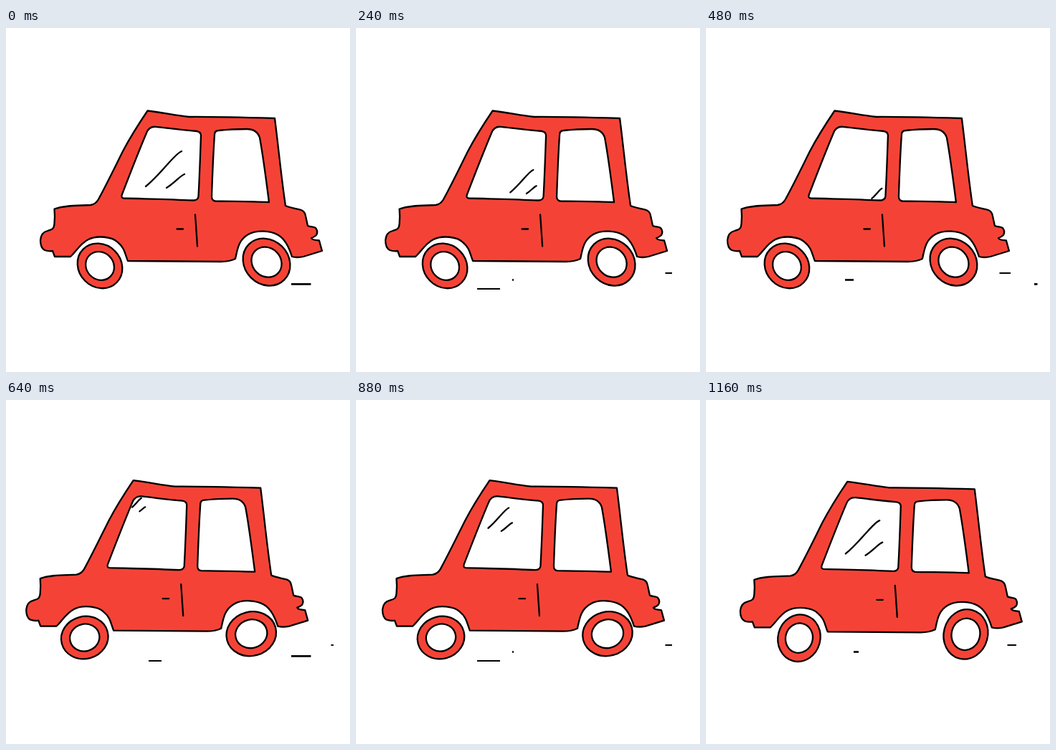
Animation, 480 px wide and 480 px high, one loop 1200 ms. Source, as an HTML page with a canvas:

```html
<!DOCTYPE html>
<html lang="en">
<head>
<meta charset="utf-8">
<title>Red car</title>
<style>
  html, body { margin: 0; width: 100%; height: 100%; overflow: hidden; background: #fff; }
  canvas { display: block; width: 480px; height: 480px; }
</style>
</head>
<body>
<canvas id="stage" width="480" height="480"></canvas>
<script>
const ctx = document.getElementById('stage').getContext('2d');
const RED = '#f44336', INK = '#000', WHITE = '#fff';
const LOOP = 1200, STEP = 40;

const body = new Path2D(`M197.5 115.5 C220 118 236 122 256 124 C292 123.7 332 124.8 375 126
  C380 165 384 208 390 248 C397 251 405 252 412 254 Q417 256 418 262 L421 276
  C426 278 429 277 432 279 Q436 284 433 289 Q430 292 426 293 Q427 296 437 296.5
  L441 311 L415 319 Q406 321 399 319 C395 306 390 295 380 289
  C370 283 350 281 338 288 C324 296 323 309 320 322 Q312 326 300 326
  C255 326 215 325 170 325 C166 316 166 307 156 299
  C148 291 127 289 115 295 C103 301 98 312 90 319 L68 319 L65 311
  C60 312 57 311 54 310 Q48 307 48 296 Q49 285 58 283 C65 281 67 280 67.5 273
  L68 263 L67.5 252.5 C82 247 100 248 118 247 Q125 246 129 239
  C143 213 152 194 163 172 C173 153 185 134 197.5 115.5 Z`);
const frontWindow = new Path2D(`M209 137.8 C230 140 248 143 266 144 Q272 145 272 150
  C271 180 270 207 268.5 235 Q268 240 262 240.5 C228 239 198 238.5 164 237.5
  Q160 237 162 232 C172 206 184 175 196 146.5 Q199.5 137 209 137.8 Z`);
const rearWindow = new Path2D(`M297 143 C310 141.5 322 141 336 141 Q350 141 354 153
  C359 180 363 212 367 243 C342 242 317 242 292 241.5 Q287 241 287 235
  C288 206 289 178 291 149 Q291 143 297 143 Z`);

// Glare strokes as [tail x, tail y, tip x, tip y].
const glares = [
  { full: [195, 221, 245, 172], out: [263, 242, 268, 237], start: [196, 148, 206, 138] },
  { full: [224, 223, 249, 204], out: [276, 243, 273, 245], start: [205, 154, 211.5, 149] }
];

// Each road dash shrinks as its tail catches up with its head.
const dashes = [
  { start: 0, y: 357.4, tail: 398, head: 425.5, vTail: 15, vHead: 9.25, w: 2.7 },
  { start: 2, y: 351.5, tail: 170, head: 192, vTail: 12, vHead: 7, w: 2.6 },
  { start: 4, y: 342, tail: 409.5, head: 425, vTail: 11, vHead: 8, w: 2 },
  { start: 6, y: 364, tail: 169, head: 201, vTail: 15, vHead: 8, w: 2 }
];

const wheels = [
  { x: 130.4, y: 331.3, rim: [33, 29.5], hub: [20.8, 18.9] },
  { x: 362.9, y: 326, rim: [35, 30.7], hub: [22.3, 19.8] }
];

const mix = (a, b, k) => a.map((v, i) => v + (b[i] - v) * k);

function paint(path, fill) {
  ctx.fillStyle = fill;
  ctx.fill(path);
  ctx.stroke(path);
}

function line(x1, y1, x2, y2) {
  ctx.beginPath();
  ctx.moveTo(x1, y1);
  ctx.lineTo(x2, y2);
  ctx.stroke();
}

function drawGlare(g, t) {
  const half = LOOP / 2;
  const [x, y, tx, ty] = t < half
    ? mix(g.full, g.out, t / half)
    : mix(g.start, g.full, (t - half) / half);
  const dx = tx - x, dy = ty - y;
  ctx.beginPath();
  ctx.moveTo(x, y);
  ctx.bezierCurveTo(x + dx * 0.43, y + dy * 0.35, x + dx * 0.8, y + dy * 0.93, tx, ty);
  ctx.stroke();
}

function drawBody(t) {
  paint(body, RED);
  paint(rearWindow, WHITE);
  ctx.fillStyle = WHITE;
  ctx.fill(frontWindow);
  ctx.save();
  ctx.clip(frontWindow);
  glares.forEach(g => drawGlare(g, t));
  ctx.restore();
  ctx.stroke(frontWindow);
  line(264, 260.5, 267, 304.5);
  line(238.5, 280.5, 247, 280.5);
}

// Slightly oval rings, set a little off their axle.
function drawWheel(wheel, angle) {
  ctx.save();
  ctx.translate(wheel.x, wheel.y);
  ctx.rotate(angle);
  for (const [radii, fill] of [[wheel.rim, RED], [wheel.hub, WHITE]]) {
    const ring = new Path2D();
    ring.ellipse(0.9, 0, radii[0], radii[1], 0, 0, Math.PI * 2);
    paint(ring, fill);
  }
  ctx.restore();
}

function drawDash(d, step) {
  if (step < d.start) return;
  const age = (step - d.start) % 8;
  const tail = d.tail + d.vTail * age, head = d.head + d.vHead * age;
  if (tail >= head) return;
  ctx.lineWidth = d.w;
  line(tail, d.y, head, d.y);
}

function draw(now) {
  const step = Math.floor((now % LOOP) / STEP);
  const t = step * STEP;
  const sway = -10 * (1 - Math.cos(2 * Math.PI * t / LOOP));
  // Body lift and wheel turn share one back-and-forth beat.
  const beat = 1 - Math.abs(1 - (step % 6) / 3);

  ctx.fillStyle = WHITE;
  ctx.fillRect(0, 0, 480, 480);
  ctx.strokeStyle = INK;
  ctx.lineJoin = 'round';
  ctx.lineCap = 'butt';
  dashes.forEach(d => drawDash(d, step));

  ctx.lineWidth = 2.3;
  ctx.lineCap = 'round';
  ctx.save();
  ctx.translate(sway, -5 * beat);
  drawBody(t);
  ctx.restore();

  ctx.save();
  ctx.translate(sway, 0);
  wheels.forEach(w => drawWheel(w, Math.PI * (0.25 + beat)));
  ctx.restore();
}

const begin = performance.now();
function tick() {
  draw(performance.now() - begin);
  requestAnimationFrame(tick);
}
tick();
</script>
</body>
</html>
```
